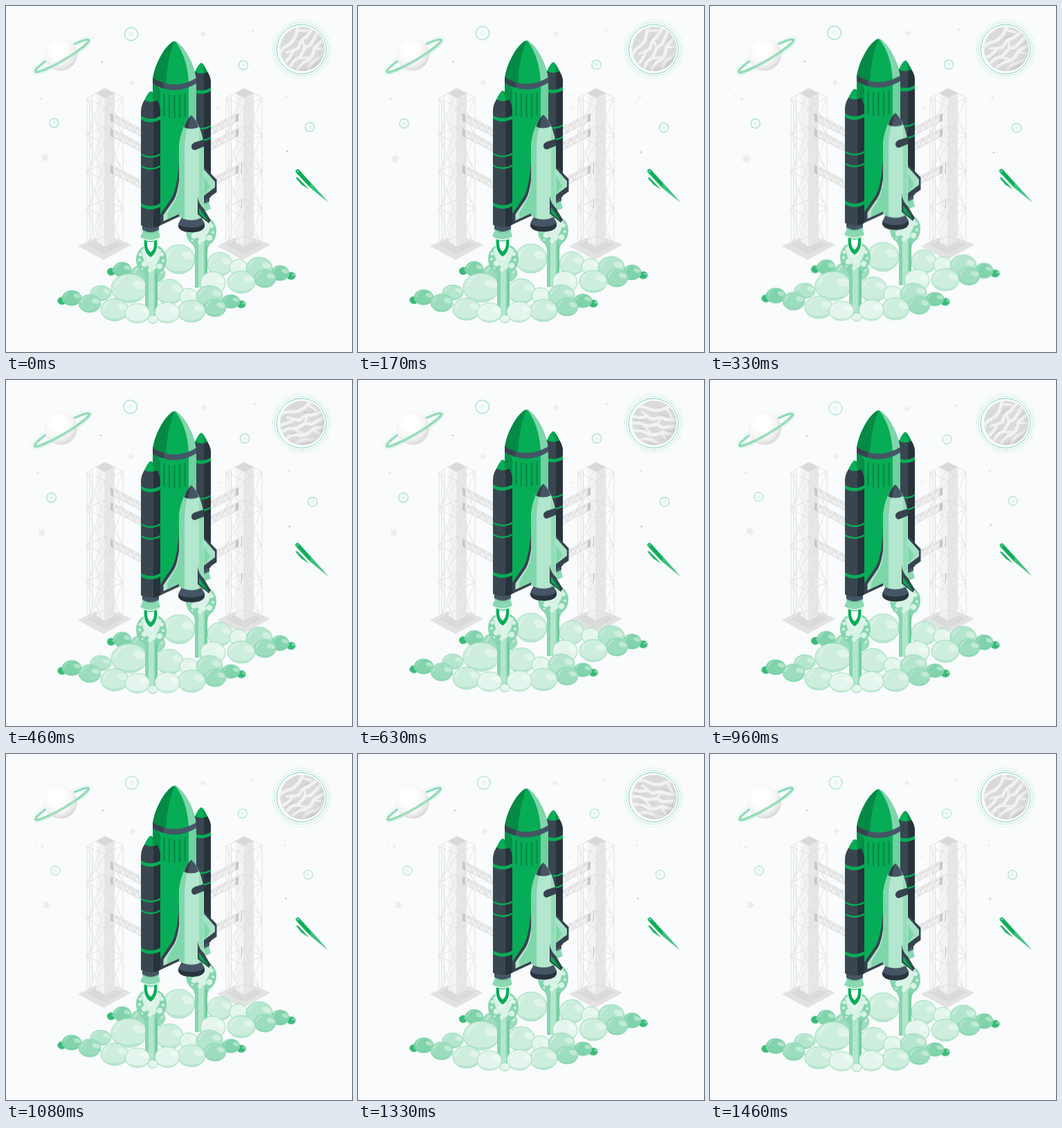
These frames come from a looping animation (500 px wide and 500 px high, 1500 ms). An HTML page:

```html
<!DOCTYPE html>
<html lang="en">
<head>
<meta charset="utf-8">
<title>Rocket launch</title>
<style>
  html, body { margin: 0; width: 100%; height: 100%; overflow: hidden; background: #f9fbfd; }
  svg { display: block; width: 100vw; height: 100vh; }
  .lift { animation: lift 1.5s cubic-bezier(.37, 0, .63, 1) infinite; }
  .drift { animation: drift 1.5s ease-in-out infinite; }
  .stars { transform-origin: 247px 128px; }
  .orbit { transform-origin: 81px 72px; }
  .meteor { transform-origin: 441px 259px; }
  .marble { transform-origin: 428px 62px; animation: sway .75s ease-in-out infinite; }
  @keyframes lift { 0%, 100% { transform: translateY(0); } 50% { transform: translateY(-8.6px); } }
  @keyframes drift {
    0%, 100% { transform: scale(1); }
    18%, 45% { transform: scale(1.021); }
    72%, 90% { transform: scale(.988); }
    97.4% { transform: scale(.99); }
  }
  @keyframes sway {
    0%, 100% { transform: rotate(-52deg); }
    12% { transform: rotate(-64deg); }
    44% { transform: rotate(-38deg); }
    82% { transform: rotate(6deg); }
    95% { transform: rotate(-45deg); }
  }
</style>
</head>
<body>
<svg viewBox="0 0 500 500" xmlns="http://www.w3.org/2000/svg">
  <defs>
    <radialGradient id="ball" cx=".4" cy=".36" r=".66">
      <stop offset=".35" stop-color="#fff"/><stop offset=".75" stop-color="#f1f1f1"/><stop offset="1" stop-color="#d9d9d9"/>
    </radialGradient>
    <radialGradient id="shade" cx=".42" cy=".42" r=".62">
      <stop offset=".6" stop-color="#fff" stop-opacity="0"/><stop offset="1" stop-color="#aaa" stop-opacity=".5"/>
    </radialGradient>
    <clipPath id="disc"><circle cx="428" cy="62" r="32"/></clipPath>
  </defs>

  <g class="drift stars" id="stars"></g>

  <g fill="none">
    <g class="drift orbit"><g transform="translate(81 72) rotate(-30.5)">
      <ellipse rx="50" ry="11" stroke="#e4f4ec"/>
      <ellipse rx="45" ry="6.5" stroke="#8cdab3" stroke-width="3.2"/>
    </g></g>
    <circle cx="79" cy="69.5" r="24" fill="url(#ball)"/>
    <g class="drift orbit"><g transform="translate(81 72) rotate(-30.5)">
      <path d="M-45 0A45 6.5 0 0 0 45 0" stroke="#8cdab3" stroke-width="3.4"/>
      <path d="M-43 2.5A44 6 0 0 0 43 2.5" stroke="#b5e7cf" stroke-width=".7"/>
    </g></g>
  </g>

  <g fill="none">
    <circle cx="427" cy="62.5" r="42.5" stroke="#d5efe2" stroke-width=".7"/>
    <circle cx="427" cy="62.5" r="39" stroke="#b9e6d0" stroke-width=".8"/>
    <circle cx="427" cy="62.5" r="35.8" stroke="#84d6ab"/>
    <g clip-path="url(#disc)">
      <path d="M390 20h76v84h-76z" fill="#dadada"/>
      <g class="marble" stroke="#f3f3f3" stroke-width="4.5" stroke-linecap="round" stroke-linejoin="round">
        <path d="M398 42q11-5 21 0t24-2 18 2M394 53q13 5 23 0l9 4q12-6 18-1h16M393 65l14-2 10 4 15-3 8 4 20-3M397 77q12-6 20 0t23-2l18 3M408 88q12-5 20 0t22-1"/>
        <path d="M410 47l9 6M437 57l-8 9M416 69l8 8M446 42l7 9M440 77l7 9" stroke-width="3"/>
        <path d="M400 59l13 1M435 49l12 2M407 72l8 0M446 72l10 1" stroke="#cecece" stroke-width="2"/>
      </g>
    </g>
    <circle cx="428" cy="62" r="32.3" fill="url(#shade)"/>
  </g>

  <g class="drift meteor">
    <path d="M419 240.5a2.8 2.8 0 0 1 5-3.2L441 256l24 27-27-22z" fill="#06ad56"/>
    <path d="M441 256l24 27-27-22z" fill="#3cbf7d"/>
    <circle cx="421.6" cy="239" r="1.1" fill="#d6f3e4"/>
    <path d="M419 248.500q1-1.500 2.500-.5L438 265l-11-7z" fill="#06ad56"/>
  </g>

  <g id="towers"></g>
  <path d="M340.500 226v15M340.500 279v13" stroke="#8adab4"/>

  <g class="lift">
    <g id="back"></g>
    <g id="plumes"></g>
    <g id="front"></g>

    <g id="farBooster"></g>
    <g id="tank">
      <path d="M212 108v198l11 8 45-20 7-20V108z" fill="#06ad56"/>
      <path d="M212 108v112h10V120z" fill="#069149"/>
      <path d="M264 112v180h11V108z" fill="#6fd0a0"/>
      <path d="M212 107C214 86 228 61 239 53Q243.500 49 248 53C259 61 273 86 275 107Q243.500 126 212 107z" fill="#06ad56"/>
      <path d="M212 107C214 86 228 61 239 53Q241 51 243.500 51.200Q233 76 231 114Q220 112 212 107z" fill="#058a45"/>
      <path d="M245 51.500Q263 76 264 113Q271 111 275 107C273 86 259 61 248 53z" fill="#80d6ab"/>
      <path d="M212 104Q243.500 123 275 104v8Q243.500 131 212 112z" fill="#455565"/>
      <path d="M212 104Q220 109 228 111v8Q219 117 212 112z" fill="#37434f"/>
      <path d="M221.500 123v31M228.500 127v32M236 129v32M243.500 130v32M251 129v32M258.500 127v32" stroke="#058a45" stroke-width="2.400" stroke-linecap="round"/>
    </g>
    <g id="shuttle">
      <path d="M251 208Q249 262 239 278L223 301v16l28-13z" fill="#36434f"/>
      <path d="M251 242Q249 270 242 281L227.500 302v9l23.500-11z" fill="#b2e6cd"/>
      <path d="M251 256Q248 276 243 283L233 300v8l18-8z" fill="#80d6ab"/>
      <path d="M286 232l18.500 19v18L286 282z" fill="#36434f"/>
      <path d="M286 236l16 18v8l-16 12z" fill="#a5e1c4"/>
      <path d="M286 246l9 15-9 13z" fill="#80d6ab"/>
      <path d="M249 315q18 8 38-1v5q-3 8-19 8t-19-8z" fill="#2a343e"/>
      <path d="M254 305h28l5 9q-5 6-19 6t-19-5z" fill="#455565"/>
      <path d="M268 158C259 165 250 188 250 207V304q18 11 36 0V207C286 188 277 165 268 158z" fill="#b2e6cd"/>
      <path d="M268 158C259 165 250 188 250 207V304q4 3 8 4V207Q258 180 268 158z" fill="#80d6ab"/>
      <path d="M279 178Q284 190 285 207v97l-6 3z" fill="#93dcb7"/>
      <path d="M268 158Q261 164 257.500 175q10 5 21 0Q275 164 268 158z" fill="#455565"/>
      <path d="M268 158Q261 164 257.500 175q3 2 6 2.300Q264 166 268 158z" fill="#323f49"/>
      <path d="M286 193l-13 4q-6 3-5 7 1 5 6 4l12-5z" fill="#36434f"/>
      <path d="M277 275q1 11 9 18l10 17-3 4-16-13z" fill="#36434f"/>
      <path d="M279 292l13 14 1 6-14-12z" fill="#06ad56"/>
      <path d="M280 294l13 14v3z" fill="#263038"/>
    </g>
    <g id="nearBooster"></g>
  </g>
</svg>
<script>
const NS = 'http://www.w3.org/2000/svg';
const $ = id => document.getElementById(id);

function add(parent, tag, attrs) {
  const el = document.createElementNS(NS, tag);
  for (const k in attrs) el.setAttribute(k, attrs[k]);
  return parent.appendChild(el);
}
const path = (g, d, fill, more) => add(g, 'path', { d, fill, ...more });
const line = (g, d, stroke, width = 1) => path(g, d, 'none', { stroke, 'stroke-width': width });
const dot = (g, cx, cy, r, fill, more) => add(g, 'circle', { cx, cy, r, fill, ...more });

function drawStars(g) {
  for (const [x, y, r] of [[181, 40.5, 9.5], [343, 85.5, 6.5], [69.3, 169, 6.5], [439, 175, 6.5]]) {
    dot(g, x, y, r, 'none', { stroke: '#8edbb5', 'stroke-width': 1 });
    dot(g, x, y, r / 4, 'none', { stroke: '#c4ead7', 'stroke-width': .8 });
  }
  for (const [x, y, r] of [[285, 41, 4.5], [182, 111, 4.7], [56.3, 219, 7.2], [307, 148, 2.5]]) {
    const pts = [...Array(10)].map((_, i) => {
      const a = i * Math.PI / 5 - 1.3, s = i % 2 ? r * .5 : r;
      return [x + s * Math.cos(a), y + s * Math.sin(a)].join();
    });
    add(g, 'polygon', { points: pts.join(' '), fill: '#ebecee' });
  }
  for (const [x, y, r] of [[357, 36, 1.6], [348, 42, 1], [405, 132, 1.5], [401, 137, 1], [50, 134, 1.7], [41, 129, 1]])
    dot(g, x, y, r, '#e3e5e7');
  dot(g, 139, 81, 1.2, '#bfc3c6');
  dot(g, 406.5, 210, 1.3, '#bfc3c6');
}

function drawTower(g, dx) {
  const t = add(g, 'g', { transform: `translate(${dx})` }), c = '#dfe0e1';
  path(t, 'M104 347l38-19 39 17-40 22z', '#e2e2e2');
  path(t, 'M117 345l26-12 26 12-26 14z', '#d9d9d9');
  path(t, 'M131 126v215l12 7V133z', '#f3f3f3');
  path(t, 'M143 133v215l14-7V126z', '#e7e7e7');
  path(t, 'M130 126l13-7 14 7-14 7z', '#d8d8d8');
  line(t, 'M117 133l26-14 26 13-26 14zM117 133v205l26 14 26-14V132M143 146v206M121 136v204M124.500 130v200', c);
  for (let y = 133; y < 300; y += 53) {
    line(t, `M117 ${y + 53}l26 14 26-14-26-13z`, c);
    line(t, `M117 ${y}l26 66 26-67M117 ${y + 53}l26-40 26 40M119 ${y + 51}l24-64 24 64`, c, .8);
  }
}

function drawArms(g, flip) {
  const a = add(g, 'g', flip ? { transform: 'translate(487) scale(-1 1)' } : {});
  for (const y of [156, 178, 231]) {
    path(a, `M155 ${y}l45 24v12l-45-24z`, '#f0f0f0');
    let zig = `M155 ${y + 11}`;
    for (let i = 1; i < 10; i++) zig += `L${155 + i * 5} ${y + i * 2.65 + (i % 2 ? 0 : 11)}`;
    line(a, `M155 ${y}l45 24M155 ${y + 11}l45 24M155 ${y + 3}l45 24`, '#dcdcdc');
    line(a, zig, '#d8d8d8', .9);
    path(a, `M151 ${y - 1}l4 2v11l-4-2z`, '#c6c6c6');
  }
}

const TINTS = ['#e3f5ec', '#cdeedd', '#b4e5cd', '#9cddbd', '#80d3aa', '#38ba79'];

function drawPuff(g, [x, y, rx, ry, tint]) {
  const p = add(g, 'g', { transform: `translate(${x} ${y}) scale(${rx} ${ry})` });
  dot(p, 0, 0, 1, TINTS[tint], { stroke: '#8ed8b3', 'stroke-width': .8, 'vector-effect': 'non-scaling-stroke' });
  path(p, 'M-.97 .2A1 1 0 0 0 .97 .2Q.75 .8 0 .8T-.97 .2z', '#57c48f', { opacity: .2 });
  add(p, 'ellipse', { cx: .36, cy: -.48, rx: .38, ry: .27, fill: '#fff', opacity: .38, transform: 'rotate(28)' });
  if (rx > 8) path(p, 'M-.85 -.1Q-.7 -.75 -.15 -.87Q-.6 -.55 -.72 -.05z', '#fff', { opacity: .3 });
}

function drawPlume(g, x, y, bottom) {
  path(g, `M${x - 22} ${y}a22 22 0 0 1 44 0q0 13-9 19-4 4-4 12V${bottom}h-18V${y + 31}q0-8-4-12-9-6-9-19z`, '#86d6ae');
  path(g, `M${x - 4} ${y + 12}h8V${bottom}h-8z`, '#b4e6ce');
  path(g, `M${x + 6} ${y + 20}h3V${bottom}h-3z`, '#73cb9f');
  path(g, `M${x - 15} ${y - 13}q14-10 30 0l-4 14q-5 10-11 12-7-2-11-12z`, '#d9f2e6');
  const bubbles = [[2, 10, 5.5], [12, 10, 4.3], [-10, 7, 4.3], [-2, 16, 3], [17, 2, 2], [-17, 1, 2], [15, -7, 3], [-16, -7, 2.5], [-13, 14, 1.5]];
  for (const [bx, by, r] of bubbles) dot(g, x + bx, y + by, r, '#daf3e7');
}

// Ring that sags around a cylinder 28 wide.
const hoop = (x, y, h) => `M${x - 14} ${y}q14 8 28 0v${h}q-14 8-28 0z`;

function drawBooster(g, x, top, bands) {
  const y = top, end = y + 194;
  path(g, `M${x - 12} ${end + 10}h24l2 7q-14 8-29 0z`, '#8bd9b2');
  path(g, `M${x - 12} ${end - 2}h24v11q-12 7-24 0z`, '#7dd0a7');
  path(g, `M${x - 12} ${end}q12 8 24 0v6q-12 8-24 0z`, '#455565');
  path(g, `M${x - 9} ${y + 13}Q${x - 14} ${y + 21} ${x - 14} ${y + 29}V${end}q14 8 28 0V${y + 29}Q${x + 14} ${y + 21} ${x + 9} ${y + 13}z`, '#394650');
  path(g, `M${x + 4} ${y + 13}V${end + 3.500}q6-1 10-3.500V${y + 29}Q${x + 14} ${y + 21} ${x + 9} ${y + 13}z`, '#28323b');
  path(g, `M${x} ${y}q-4 2-9 13 9 5 18 0-5-11-9-13z`, '#06ad56');
  path(g, `M${x} ${y}q4 2 9 13-2 1.500-5 2 0-9-4-15z`, '#07924a');
  for (const b of bands) path(g, hoop(x, y + b, b === 36 || b === 162 ? 5 : 2.600), '#06ad56');
}

function drawFlame(g) {
  path(g, 'M197 335q13 6 25 0l-3 16q-3 14-10 19-8-5-10-19z', '#e3f6ed');
  path(g, 'M200 338q9 4 18 0 2 18-9 25-11-7-9-25z', '#06ad56');
  path(g, 'M204 340q5 2 10 0 1 11-5 16-6-5-5-16z', '#fff');
}

const backPuffs = [
  [250, 366, 23, 21, 1], [309, 373, 18, 17, 1], [336, 378, 13, 12, 0], [412, 390, 6.5, 5.5, 5],
  [396, 386, 13, 11, 4], [366, 379, 19, 16, 2], [374, 394, 16, 13, 3],
  [152, 384, 6, 5.5, 5], [168, 381, 13, 11, 4], [205, 387, 25, 15, 3]
];
const frontPuffs = [
  [340, 399, 20, 16, 1], [299, 400, 18, 16, 0],
  [178, 408, 26, 21, 1], [137, 415, 15, 11, 2], [81, 426, 6.5, 5.5, 5], [95, 422, 14, 11, 4],
  [121, 430, 16, 13, 3], [236, 413, 20, 18, 1], [264, 420, 13, 12, 0]
];
const nearPuffs = [
  [157, 439, 20, 16, 1], [340, 431, 6.5, 5.5, 5], [325, 427, 13, 10, 4], [294, 419, 19, 15, 2],
  [302, 436, 16, 13, 3], [268, 441, 20, 16, 1], [190, 444, 18, 14, 0], [233, 443, 18, 15, 0], [212, 453, 7, 6, 0]
];

drawStars($('stars'));
for (const dx of [0, 201]) drawTower($('towers'), dx);
for (const flip of [false, true]) drawArms($('towers'), flip);

for (const p of backPuffs) drawPuff($('back'), p);
drawPlume($('plumes'), 282, 325, 407);
for (const p of frontPuffs) drawPuff($('front'), p);
drawPlume($('front'), 210, 366, 451);
for (const p of nearPuffs) drawPuff($('front'), p);

const bands = [36, 90, 107, 162];
drawBooster($('farBooster'), 282, 82, bands);
drawFlame($('nearBooster'));
drawBooster($('nearBooster'), 209, 123, bands);
</script>
</body>
</html>
```
